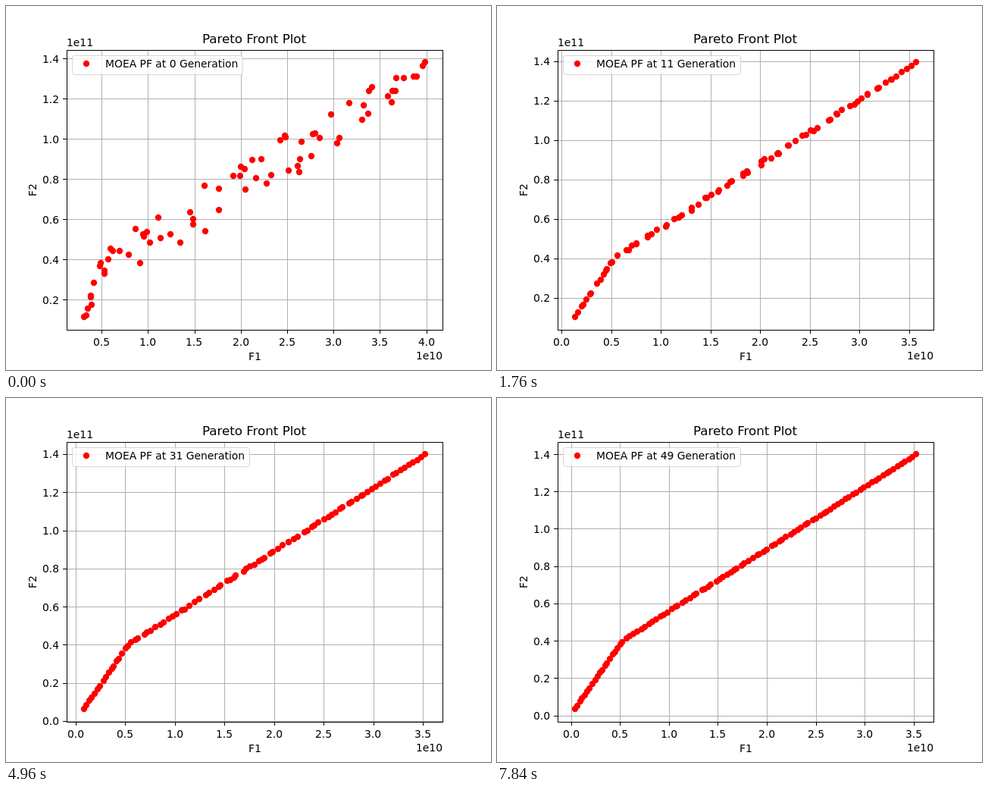
An HTML page with a canvas for the animation above (8000 ms loop, 640x480 px).

```html
<!DOCTYPE html>
<html lang="en">
<head>
<meta charset="utf-8">
<title>Pareto Front Plot</title>
<style>
  html, body { margin: 0; width: 100%; height: 100%; overflow: hidden; background: #fff; }
  canvas { display: block; }
</style>
</head>
<body>
<canvas id="plot" width="640" height="480"></canvas>
<script>
const ctx = document.getElementById('plot').getContext('2d');
const GENERATIONS = 50, STEP_MS = 160;
const BOX = { left: 80, top: 57.6, width: 496, height: 369.6 };
const FONT = '13.89px "DejaVu Sans", sans-serif';
const TITLE_FONT = '16.67px "DejaVu Sans", sans-serif';

// The ends of the front jump to new best solutions at these generations.
const ENDS = [
  { since: 0, min: [.308, .112], max: [3.99, 1.38] },
  { since: 4, min: [.198, .1545], max: [3.556, 1.3875] },
  { since: 9, min: [.133, .1004], max: [3.572, 1.3927] },
  { since: 16, min: [.111, .0837], max: [3.573, 1.3907] },
  { since: 25, min: [.08, .062], max: [3.527, 1.3984] },
  { since: 35, min: [.0463, .0388], max: [3.527, 1.3984] },
  { since: 45, min: [.0387, .033], max: [3.527, 1.3984] }
];
const KNEE = [.535, .403];

const mix = (a, b, t) => a + (b - a) * t;
const mixPoint = (p, q, t) => [mix(p[0], q[0], t), mix(p[1], q[1], t)];
const random = seed => {
  const s = Math.sin(seed * 12.9898 + 4.137) * 43758.5453;
  return s - Math.floor(s);
};

// Solutions lie along the bent front; scatter and uneven spacing fade with time.
function population(gen, { min, max }) {
  const count = Math.round(74 + gen / 2);
  const spread = .25 / (1 + gen), jitter = 10 / (1 + gen / 4) / count;
  const length = (p, q) => Math.hypot(
    (q[0] - p[0]) / (max[0] - min[0]) * BOX.width,
    (q[1] - p[1]) / (max[1] - min[1]) * BOX.height);
  const lower = length(min, KNEE), bend = lower / (lower + length(KNEE, max));

  return Array.from({ length: count }, (_, i) => {
    const even = i / (count - 1);
    const freedom = Math.sqrt(Math.max(0, Math.sin(Math.PI * even)));
    const s = even + (random(i) - .5) * jitter * freedom;
    const [x, y] = s < bend
      ? mixPoint(min, KNEE, s / bend)
      : mixPoint(KNEE, max, (s - bend) / (1 - bend));
    return [x, y - (random(i + 500) - .3) * spread * freedom];
  });
}

function limits(lo, hi) {
  const margin = (hi - lo) * .05;
  return [lo - margin, hi + margin];
}

function ticks([lo, hi], step) {
  const list = [];
  for (let k = Math.ceil(lo / step); k * step <= hi; k++) list.push(k * step);
  return list;
}

const snap = v => Math.round(v) + .5;

function line(x0, y0, x1, y1, color) {
  ctx.strokeStyle = color;
  ctx.beginPath();
  ctx.moveTo(x0, y0);
  ctx.lineTo(x1, y1);
  ctx.stroke();
}

// anchor: 0 = left, .5 = centre, 1 = right
function text(str, x, y, anchor = .5, font = FONT) {
  ctx.font = font;
  ctx.fillStyle = '#000';
  ctx.fillText(str, Math.round(x - ctx.measureText(str).width * anchor), Math.round(y));
}

function dot(x, y) {
  ctx.fillStyle = '#f00';
  ctx.beginPath();
  ctx.arc(Math.round(x), Math.round(y), 4.17, 0, Math.PI * 2);
  ctx.fill();
}

function drawLegend(gen) {
  const label = `MOEA PF at ${gen} Generation`;
  ctx.font = FONT;
  const width = Math.round(ctx.measureText(label).width + 49.5);
  ctx.beginPath();
  ctx.roundRect(87.5, 65.5, width, 25, 2.8);
  ctx.fillStyle = 'rgba(255,255,255,.8)';
  ctx.fill();
  ctx.strokeStyle = 'rgba(204,204,204,.8)';
  ctx.stroke();
  dot(106.4, 76.4);
  text(label, 131.4, 81, 0);
}

function draw(gen) {
  const ends = ENDS.findLast(e => e.since <= gen);
  const [xLim, yLim] = [0, 1].map(axis => limits(ends.min[axis], ends.max[axis]));
  const toX = v => BOX.left + BOX.width * (v - xLim[0]) / (xLim[1] - xLim[0]);
  const toY = v => BOX.top + BOX.height * (yLim[1] - v) / (yLim[1] - yLim[0]);

  ctx.fillStyle = '#fff';
  ctx.fillRect(0, 0, 640, 480);
  ctx.lineWidth = 1;

  for (const v of ticks(xLim, .5)) {
    const x = snap(toX(v));
    line(x, 58, x, 427, '#b0b0b0');
    line(x, 427, x, 432, '#000');
    text(v.toFixed(1), toX(v), 448);
  }
  for (const v of ticks(yLim, .2)) {
    const y = snap(toY(v));
    line(80, y, 576, y, '#b0b0b0');
    line(75, y, 80, y, '#000');
    text(v.toFixed(1), 70.3, toY(v) + 5.5, 1);
  }

  for (const [x, y] of population(gen, ends)) dot(toX(x), toY(y));
  ctx.strokeStyle = '#000';
  ctx.strokeRect(80.5, 58.5, 496, 369);

  text('Pareto Front Plot', 328, 49, .5, TITLE_FONT);
  text('1e11', 80, 53, 0);
  text('1e10', 576, 466, 1);
  text('F1', 328, 467);
  ctx.save();
  ctx.translate(40, 243);
  ctx.rotate(-Math.PI / 2);
  text('F2', 0, 0);
  ctx.restore();
  drawLegend(gen);
}

function tick() {
  draw(Math.floor(performance.now() / STEP_MS) % GENERATIONS);
  requestAnimationFrame(tick);
}
tick();
</script>
</body>
</html>
```
